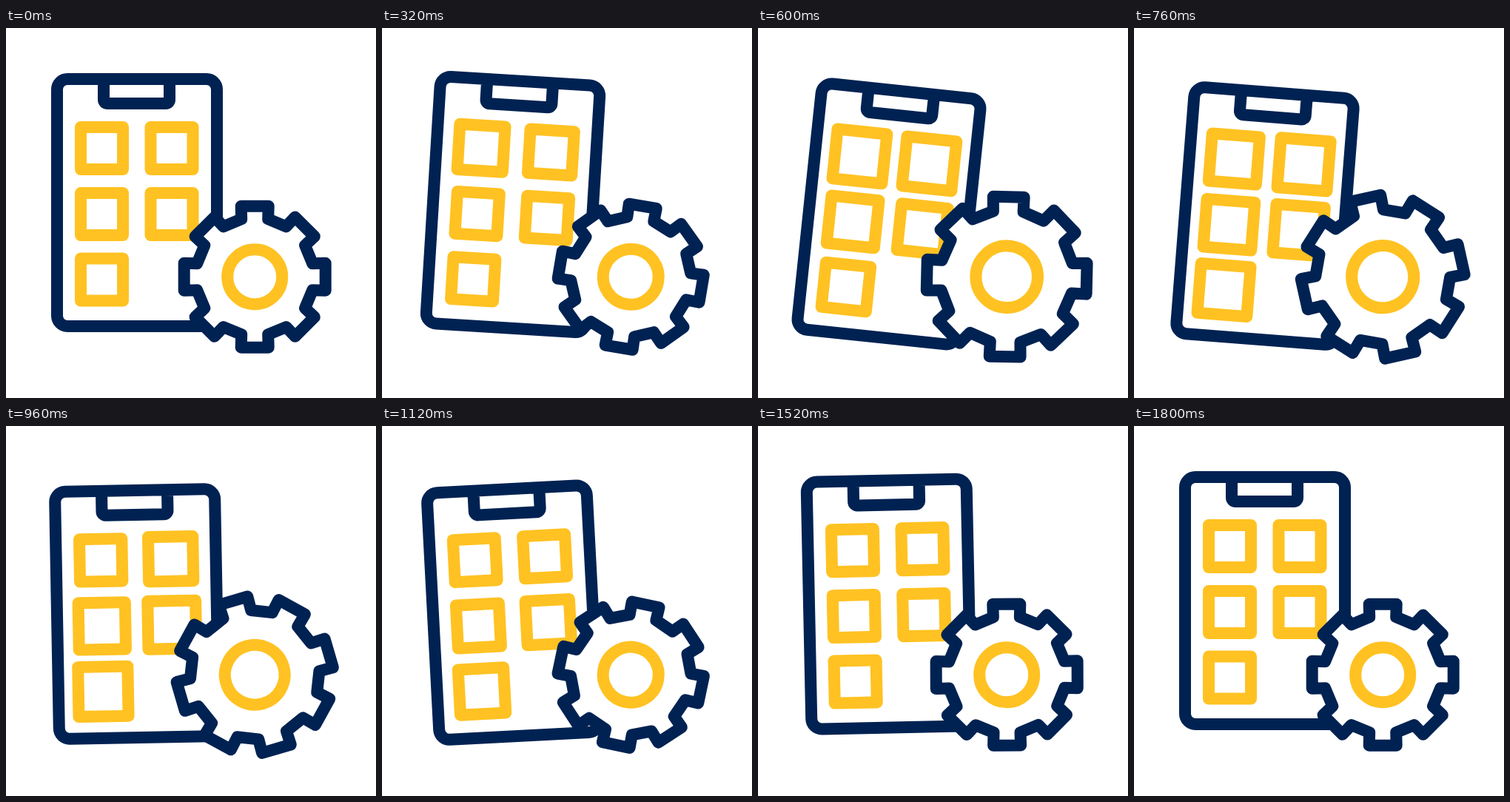
Write an HTML page with a canvas that moves like this. It is 500 px wide and 500 px high and loops after 1960 ms.

```html
<!DOCTYPE html>
<html lang="en">
<head>
<meta charset="utf-8">
<title>App settings</title>
<style>
html, body { margin: 0; width: 100%; height: 100%; overflow: hidden; background: #fff; }
canvas { display: block; width: 100vmin; height: 100vmin; }
</style>
</head>
<body>
<canvas id="stage" width="500" height="500"></canvas>
<script>
const ctx = document.getElementById('stage').getContext('2d');
const LOOP = 1960, STEP = 40;
const NAVY = '#002252', GOLD = '#ffc222';
const RAD = Math.PI / 180;

// x, y relative to the phone centre; pulse: rise start, rise end, fall start, fall end, size
const TILES = [
  { x: -47.5, y: -73.5, pulse: [150, 530, 630, 1000, 0.178] },
  { x: 47, y: -73.5, pulse: [225, 530, 760, 1080, 0.178] },
  { x: -47.5, y: 15.5, pulse: [310, 650, 860, 1200, 0.138] },
  { x: 47, y: 15.5, pulse: [390, 730, 900, 1240, 0.15] },
  { x: -47.5, y: 104, pulse: [480, 780, 950, 1260, 0.178] }
];

const smooth = p => p * p * (3 - 2 * p);

function progress(t, from, to) {
  return Math.min(1, Math.max(0, (t - from) / (to - from)));
}

function ease(t, from, to) {
  return smooth(progress(t, from, to));
}

// cubic-bezier(.42, 0, .58, 1)
function easeInOut(t, from, to) {
  const p = progress(t, from, to);
  let lo = 0, hi = 1;
  for (let i = 0; i < 20; i++) {
    const s = (lo + hi) / 2, r = 1 - s;
    const x = 1.26 * r * r * s + 1.74 * r * s * s + s * s * s;
    if (x < p) lo = s; else hi = s;
  }
  return p === 0 || p === 1 ? p : smooth(lo);
}

function bump(t, [a, b, c, d, size]) {
  return size * (ease(t, a, b) - ease(t, c, d));
}

function place(x, y, angle, draw) {
  ctx.save();
  ctx.translate(x, y);
  ctx.rotate(angle * RAD);
  draw();
  ctx.restore();
}

function line(color) {
  ctx.strokeStyle = color;
  ctx.stroke();
}

function drawTile(x, y, scale) {
  const size = 57 * scale;
  ctx.beginPath();
  ctx.rect(x - size / 2, y - size / 2, size, size);
  line(GOLD);
}

function drawPhone(t) {
  ctx.beginPath();
  ctx.roundRect(-108, -167, 216, 334, 14);
  ctx.moveTo(-45, -167);
  ctx.arcTo(-45, -134, 44, -134, 5);
  ctx.arcTo(44, -134, 44, -167, 5);
  ctx.lineTo(44, -167);
  line(NAVY);
  for (const { x, y, pulse } of TILES) drawTile(x, y, 1 + bump(t, pulse));
}

function drawGear(scale) {
  const tooth = [[-18, -78], [-18.5, -95.5], [18.5, -95.5], [18, -78]];
  ctx.beginPath();
  for (let i = 0; i < 8; i++) {
    const c = scale * Math.cos(i * 45 * RAD), s = scale * Math.sin(i * 45 * RAD);
    for (const [x, y] of tooth) ctx.lineTo(x * c - y * s, x * s + y * c);
  }
  ctx.closePath();
  ctx.fillStyle = '#fff';
  ctx.fill();
  line(NAVY);
  ctx.beginPath();
  ctx.arc(0, 0, 37 * scale, 0, 2 * Math.PI);
  line(GOLD);
}

function render(t) {
  ctx.fillStyle = '#fff';
  ctx.fillRect(0, 0, 500, 500);
  ctx.lineWidth = 16;
  ctx.lineJoin = 'round';

  const tilt = 6 * ease(t, 45, 540) - 9 * ease(t, 640, 1098) + 3 * ease(t, 1150, 1800);
  const drop = bump(t, [196, 724, 948, 1800, 18]);
  place(177, 236 + drop, tilt, () => drawPhone(t));

  const turn = 180 * easeInOut(t, 80, 1560);
  const grow = bump(t, [240, 650, 810, 1200, 0.136]);
  place(336.2, 336.2, turn, () => drawGear(1 + grow));
}

const start = performance.now();
function tick() {
  const t = (performance.now() - start) % LOOP;
  render(Math.floor(t / STEP) * STEP);
  requestAnimationFrame(tick);
}
tick();
</script>
</body>
</html>
```
